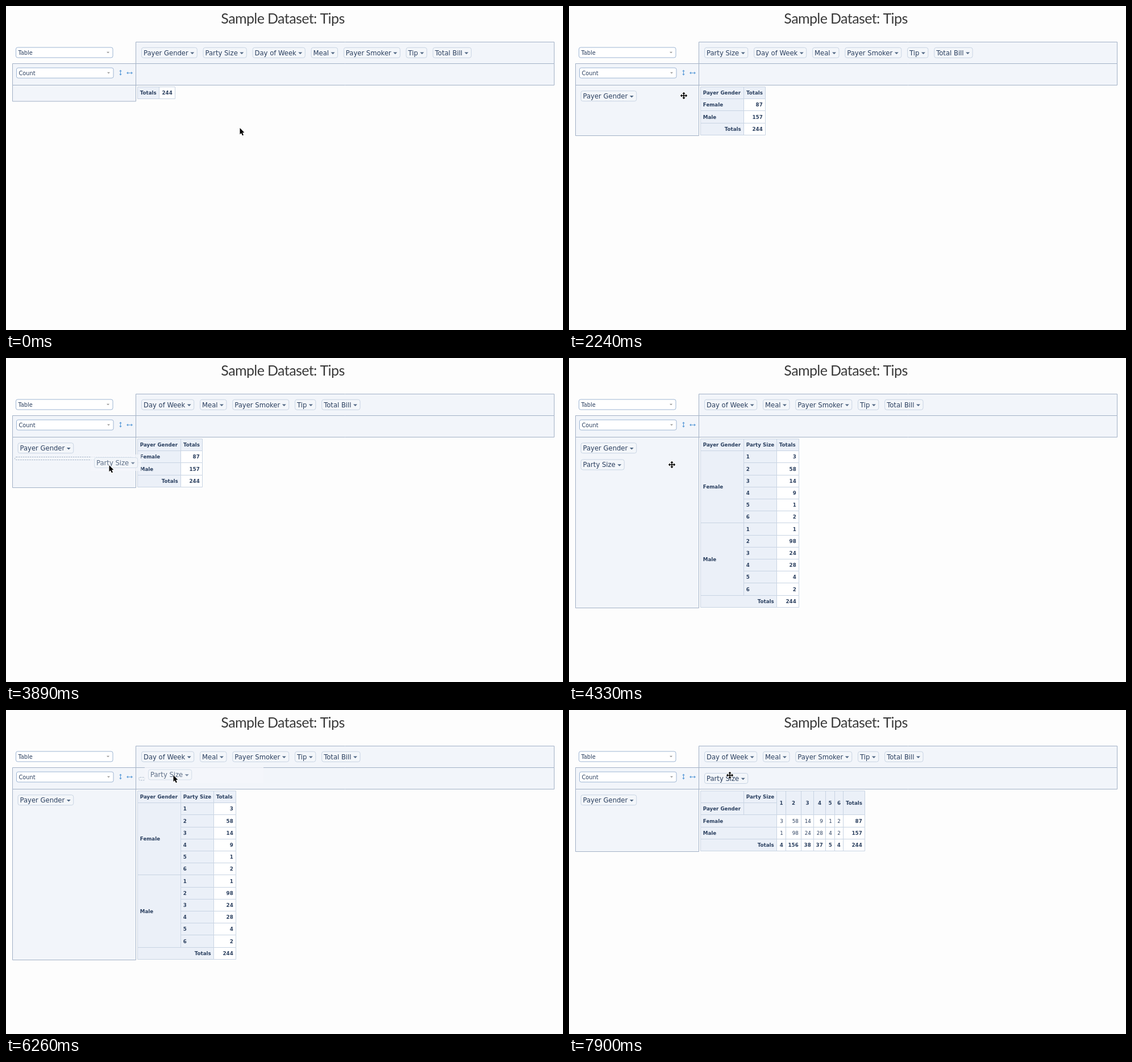
An HTML page with a canvas for the animation above (8 s loop, 980 by 571 pixels).

```html
<!DOCTYPE html>
<html lang="en">
<head>
<meta charset="utf-8">
<title>Sample Dataset: Tips</title>
<style>
html, body { margin: 0; width: 100%; height: 100%; overflow: hidden; background: #fdfdfd; }
canvas { display: block; }
</style>
</head>
<body>
<canvas id="stage" width="980" height="571"></canvas>
<script>
const ctx = document.getElementById('stage').getContext('2d');
const LOOP = 8000, STEP = 147;
const SANS = '"DejaVu Sans", Verdana, sans-serif';
const INK = '#2a3f5f', PANEL = '#f2f5fa', LINE = '#a2b1c6', SOFT = '#c8d4e3', HEAD = '#ebf0f8', BLUE = '#5b9bd8';
const CHIP = 11.6, CELL = 8.7;

const fields = ['Payer Gender', 'Party Size', 'Day of Week', 'Meal', 'Payer Smoker', 'Tip', 'Total Bill'];
const bySize = { Female: [3, 58, 14, 9, 1, 2], Male: [1, 98, 24, 28, 4, 2] };
const groups = Object.entries(bySize);
const sum = list => list.reduce((a, b) => a + b);
const sizeTotals = bySize.Female.map((n, i) => n + bySize.Male[i]);
const total = sum(sizeTotals);

// Pointer stops: it leaves for each one at `from` and rests there after `to`.
const stops = [
  { from: 0, to: 0, x: 411, y: 214 },
  { from: 290, to: 740, x: 299, y: 88 },
  { from: 1490, to: 1940, x: 202, y: 158 },
  { from: 2540, to: 3140, x: 264, y: 86 },
  { from: 3440, to: 3890, x: 181, y: 188 },
  { from: 5080, to: 5370, x: 64, y: 188 },
  { from: 5520, to: 6110, x: 282, y: 136 },
  { from: 6260, to: 6260, x: 294, y: 114 },
  { from: 6850, to: 6850, x: 297, y: 123 },
  { from: 7900, to: 7900, x: 283, y: 115 }
];

const drags = [
  { from: 1490, to: 2240, name: 'Payer Gender', dx: 61, dy: 6, cross: true },
  { from: 3440, to: 4330, name: 'Party Size', dx: 26, dy: 3.5 },
  { from: 5520, to: 6850, name: 'Party Size', dx: 44, dy: 0, width: 209 }
];

const between = (t, a, b) => t >= a && t < b;
const ease = p => 1 - (1 - p) ** 1.5;

function measure(str, size, weight = '') {
  ctx.font = `${weight} ${size}px ${SANS}`;
  return ctx.measureText(str).width;
}

function text(str, x, y, size, align = 'left', weight = '') {
  ctx.font = `${weight} ${size}px ${SANS}`;
  ctx.textAlign = align;
  ctx.fillStyle = INK;
  ctx.fillText(str, x, y);
}

function box(x0, y0, x1, y1, fill, stroke, radius = 0) {
  ctx.beginPath();
  ctx.roundRect(x0, y0, x1 - x0, y1 - y0, radius);
  ctx.fillStyle = fill;
  ctx.fill();
  ctx.strokeStyle = stroke;
  ctx.lineWidth = 1;
  ctx.stroke();
}

function shape(points, fill) {
  ctx.beginPath();
  points.forEach(([x, y]) => ctx.lineTo(x, y));
  ctx.closePath();
  ctx.fillStyle = fill;
  ctx.fill();
}

const caret = (x, y, w, color) => shape([[x - w, y - w / 2], [x + w, y - w / 2], [x, y + w / 2]], color);

const chipWidth = name => measure(name, CHIP) + 19.5;

function chip(name, x, cy) {
  const w = chipWidth(name);
  box(x + .5, cy - 9, x + w, cy + 9, '#f3f6fa', SOFT, 3.5);
  text(name, x + 4, cy + 4.3, CHIP);
  caret(x + w - 8.5, cy + 1, 3.5, '#506784');
}

function chipRow(names, cy) {
  let x = 238;
  for (const name of names) {
    chip(name, x, cy);
    x += chipWidth(name) + 10.3;
  }
}

function select(label, x, y) {
  box(x + .5, y + .5, x + 171, y + 18.5, '#fff', '#9db5d3', 3);
  text(label, x + 4.5, y + 13, 9.8);
  caret(x + 162.5, y + 9.5, 2.6, '#999');
}

function doubleArrow(x, y, half, angle) {
  ctx.save();
  ctx.translate(x, y);
  ctx.rotate(angle);
  ctx.fillStyle = BLUE;
  ctx.fillRect(-half + 1, -.5, 2 * half - 2, 1);
  for (const s of [-1, 1]) shape([[s * half, 0], [s * (half - 2.8), -2.3], [s * (half - 2.8), 2.3]], BLUE);
  ctx.restore();
}

function slot(x0, x1, y) {
  ctx.setLineDash([2.5, 1.5]);
  box(x0 + .5, y - 2.5, x1 - .5, y + 2.5, '#f3f6fa', LINE, 2.5);
  ctx.setLineDash([]);
}

const rowY = r => Math.round(142 + 21.2 * r) + .5;

// Column edges that fit the widest label of each column.
function columns(...labels) {
  let x = 231.5;
  return [x, ...labels.map(label => Math.floor(x += measure(label, CELL, 'bold') + 9.4) + .5)];
}

function cell(cols, c0, c1, r0, r1, str, align, fill = HEAD, weight = 'bold') {
  const x0 = cols[c0], x1 = cols[c1], y0 = rowY(r0), y1 = rowY(r1);
  box(x0, y0, x1, y1, fill, SOFT);
  const x = { left: x0 + 4.3, right: x1 - 4.8, center: (x0 + x1) / 2 }[align];
  text(str, x, (y0 + y1) / 2 + 3.4, CELL, align, weight);
}

const value = (cols, c, r, n, weight) => cell(cols, c, c + 1, r, r + 1, n, 'right', '#fff', weight);

function totalOnly() {
  const cols = columns('Totals', total);
  cell(cols, 0, 1, 0, 1, 'Totals', 'left');
  value(cols, 1, 0, total);
}

function genderTable() {
  const cols = columns('Payer Gender', 'Totals');
  cell(cols, 0, 1, 0, 1, 'Payer Gender', 'left');
  cell(cols, 1, 2, 0, 1, 'Totals', 'center');
  groups.forEach(([name, counts], g) => {
    cell(cols, 0, 1, g + 1, g + 2, name, 'left');
    value(cols, 1, g + 1, sum(counts));
  });
  cell(cols, 0, 1, 3, 4, 'Totals', 'right');
  value(cols, 1, 3, total);
}

function nestedTable() {
  const labels = ['Payer Gender', 'Party Size', 'Totals'];
  const cols = columns(...labels);
  labels.forEach((label, c) => cell(cols, c, c + 1, 0, 1, label, 'left'));
  groups.forEach(([name, counts], g) => {
    const top = 1 + g * counts.length;
    cell(cols, 0, 1, top, top + counts.length, name, 'left');
    counts.forEach((n, i) => {
      cell(cols, 1, 2, top + i, top + i + 1, i + 1, 'left');
      value(cols, 2, top + i, n);
    });
  });
  cell(cols, 0, 2, 13, 14, 'Totals', 'right');
  value(cols, 2, 13, total);
}

function crossTable() {
  const cols = columns('Payer Gender', 'Party Size', ...sizeTotals, 'Totals');
  cell(cols, 0, 1, 0, 1, '', 'left');
  cell(cols, 1, 2, 0, 1, 'Party Size', 'left');
  cell(cols, 0, 1, 1, 2, 'Payer Gender', 'left');
  cell(cols, 1, 2, 1, 2, '', 'left');
  cell(cols, 8, 9, 0, 2, 'Totals', 'center');
  groups.forEach(([name, counts], g) => {
    cell(cols, 0, 2, g + 2, g + 3, name, 'left');
    counts.forEach((n, i) => value(cols, i + 2, g + 2, n, ''));
    value(cols, 8, g + 2, sum(counts));
  });
  sizeTotals.forEach((n, i) => {
    cell(cols, i + 2, i + 3, 0, 2, i + 1, 'center');
    value(cols, i + 2, 4, n);
  });
  cell(cols, 0, 2, 4, 5, 'Totals', 'right');
  value(cols, 8, 4, total);
}

const views = [
  { until: 2240, rows: 1, table: totalOnly },
  { until: 4330, rows: 4, table: genderTable },
  { until: 6850, rows: 14, table: nestedTable },
  { until: LOOP, rows: 5, table: crossTable }
];

// The pointer advances in even steps; a dragged chip trails it by half a step.
function pointerAt(t) {
  const i = stops.findLastIndex(s => s.from <= t);
  const stop = stops[i], prev = stops[Math.max(i - 1, 0)];
  const count = Math.round((stop.to - stop.from) / STEP) + 1;
  const done = Math.min(Math.floor((t - stop.from) / STEP) + 1, count);
  const rest = done === count;
  const at = n => {
    const p = ease(n / count);
    return [prev.x + (stop.x - prev.x) * p, prev.y + (stop.y - prev.y) * p];
  };
  return { pos: at(done), trail: at(rest ? done : done - .5), cross: rest && i > 0 };
}

function cursor(x, y, cross) {
  ctx.save();
  ctx.translate(x, y);
  ctx.beginPath();
  if (cross) {
    for (let i = 0; i < 4; i++) {
      ctx.moveTo(-.8, 0);
      for (const [px, py] of [[-.8, -3.2], [-2.7, -3.2], [0, -6.2], [2.7, -3.2], [.8, -3.2], [.8, 0]]) ctx.lineTo(px, py);
      ctx.rotate(Math.PI / 2);
    }
  } else {
    for (const [px, py] of [[.5, 1], [.5, 12.2], [3, 9.9], [4.9, 14.3], [6.9, 13.4], [5, 9.2], [8.3, 9]]) ctx.lineTo(px, py);
    ctx.closePath();
  }
  ctx.strokeStyle = '#fff';
  ctx.lineWidth = 1.6;
  ctx.lineJoin = 'round';
  ctx.stroke();
  ctx.fillStyle = '#000';
  ctx.fill();
  ctx.restore();
}

function ghost({ name, width = chipWidth(name) + 12 }, x, y) {
  ctx.save();
  ctx.globalAlpha = .75;
  ctx.fillStyle = '#f4f7fb';
  ctx.fillRect(x - 6, y - 14.5, width, 29);
  chip(name, x, y);
  ctx.restore();
}

function title() {
  ctx.font = '25px Lato, "Open Sans", sans-serif';
  ctx.letterSpacing = '-0.6px';
  ctx.textAlign = 'center';
  ctx.fillStyle = '#3a3a3a';
  ctx.fillText('Sample Dataset: Tips', 487, 30.5);
  ctx.letterSpacing = '0px';
}

function draw(t) {
  const view = views.find(v => t < v.until);
  ctx.fillStyle = '#fdfdfd';
  ctx.fillRect(0, 0, 980, 571);
  title();

  box(228.5, 63.5, 964.5, 101.5, PANEL, LINE);
  box(11.5, 101.5, 228.5, 139.5, PANEL, LINE);
  box(228.5, 101.5, 964.5, 139.5, PANEL, LINE);
  box(11.5, 139.5, 228.5, Math.max(rowY(view.rows) + 1, 168), PANEL, LINE);
  select('Table', 17, 72.5);
  select('Count', 18, 108.5);
  doubleArrow(201.5, 117.5, 5, Math.PI / 2);
  doubleArrow(217.5, 118, 5.5, 0);
  view.table();

  chipRow(fields.slice(t < 1640 ? 0 : t < 3590 ? 1 : 2), 82.3);
  if (t >= 2240) chip('Payer Gender', 20.5, 158.7);
  if (between(t, 4330, 5670)) chip('Party Size', 20.5, 188);
  if (t >= 6850) chipRow(['Party Size'], 120.5);

  if (between(t, 1640, 1790) || between(t, 6110, 6850)) slot(233, 245, 121.3);
  if (between(t, 1790, 2240)) slot(15, 224, 147.5);
  if (between(t, 3590, 4330) || between(t, 5670, 6110)) slot(15, 224, 177);

  const { pos, trail, cross } = pointerAt(t);
  const drag = drags.find(d => between(t, d.from, d.to));
  if (drag) ghost(drag, trail[0] - drag.dx, trail[1] - drag.dy);
  cursor(...pos, drag ? drag.cross : cross);
}

const start = performance.now();
function tick() {
  draw((performance.now() - start) % LOOP);
  requestAnimationFrame(tick);
}
tick();
</script>
</body>
</html>
```
